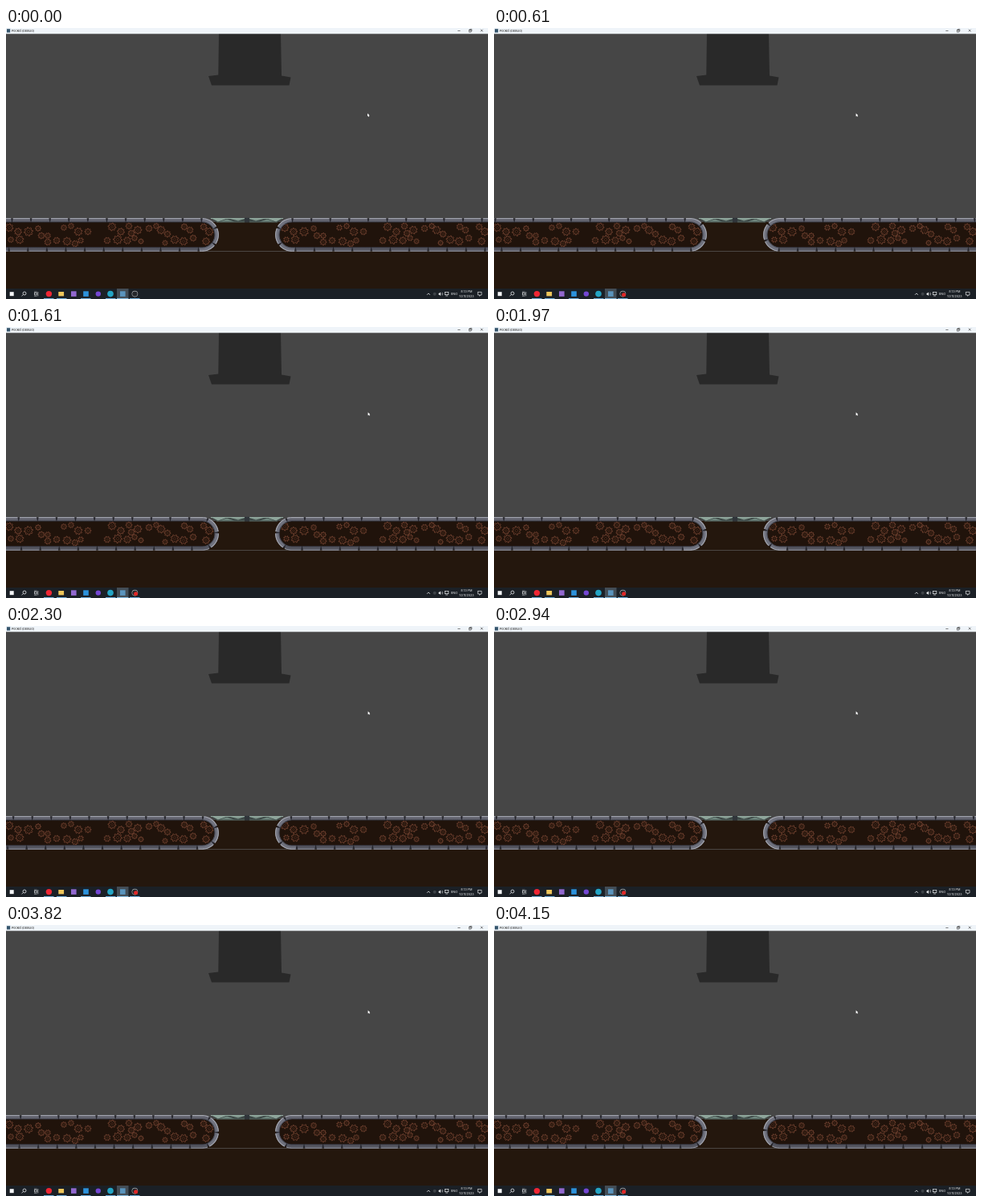
Animation, 600 px wide and 338 px high, one loop 4.18 s. Source, as an HTML page with a canvas:

```html
<!DOCTYPE html>
<html lang="en">
<head>
<meta charset="utf-8">
<title>Conveyor</title>
<style>
  html, body { margin: 0; width: 100%; height: 100%; overflow: hidden; background: #454545; }
  canvas { display: block; width: 600px; height: 338px; }
</style>
</head>
<body>
<canvas id="stage"></canvas>
<script>
const W = 600, H = 338, LOOP = 4180;
const canvas = document.getElementById('stage');
const dpr = window.devicePixelRatio || 1;
canvas.width = W * dpr;
canvas.height = H * dpr;
const ctx = canvas.getContext('2d');
const FONT = 'Inter, "Open Sans", sans-serif';

// Belt geometry: a long straight run closed by a half circle
const CAP_X = 244, MID_Y = 257.9, OUTER = 21, INNER = 15.4;
const ARC = Math.PI * OUTER, PITCH = 23.6, SPEED = 9.55 / 1000;

// x, y, radius
const GEARS = [
  [4, 249, 5], [15, 254, 4.5], [28, 254, 5.5], [40, 250, 3.5], [6, 264, 3.5],
  [17, 264, 5], [44, 259, 4], [52, 259, 3.5], [52, 267, 4], [63, 265, 4],
  [72, 249, 3.5], [81, 247, 3.5], [90, 254, 5], [102, 254, 4], [76, 266, 5],
  [86, 269, 4], [93, 265, 3.5], [132, 248, 5], [143, 254, 4.5], [153, 247, 4],
  [164, 252, 5], [156, 256, 4], [126, 265, 4], [139, 264, 5.5], [151, 265, 4.5],
  [160, 262, 3.5], [168, 266, 3.2], [178, 250, 4], [187, 247, 3.5], [193, 252, 5],
  [201, 257, 4], [198, 268, 3.2], [210, 264, 5], [222, 248, 4], [229, 252, 4],
  [221, 266, 5], [233, 262, 4], [246, 248, 4], [253, 254, 5], [249, 266, 4.5]
];

function rect(x, y, w, h, color) {
  ctx.fillStyle = color;
  ctx.fillRect(x, y, w, h);
}

function disc(x, y, r, color) {
  ctx.fillStyle = color;
  ctx.beginPath();
  ctx.arc(x, y, r, 0, Math.PI * 2);
  ctx.fill();
}

function poly(points, color) {
  ctx.fillStyle = color;
  ctx.beginPath();
  for (const [x, y] of points) ctx.lineTo(x, y);
  ctx.closePath();
  ctx.fill();
}

function line(points, color, width) {
  ctx.strokeStyle = color;
  ctx.lineWidth = width;
  ctx.beginPath();
  for (const [x, y] of points) ctx.lineTo(x, y);
  ctx.stroke();
}

function label(text, x, y, size, color, align = 'left') {
  ctx.font = size + 'px ' + FONT;
  ctx.fillStyle = color;
  ctx.textAlign = align;
  ctx.textBaseline = 'middle';
  ctx.fillText(text, x, y);
}

function beltPoint(s, r) {
  if (s < 0) return [CAP_X + s, MID_Y - r];
  if (s > ARC) return [CAP_X - (s - ARC), MID_Y + r];
  const a = s / OUTER;
  return [CAP_X + r * Math.sin(a), MID_Y - r * Math.cos(a)];
}

function beltCurve(from, to, r) {
  const n = 14, points = [];
  for (let i = 0; i <= n; i++) points.push(beltPoint(from + (to - from) * i / n, r));
  return points;
}

function insidePath(r) {
  ctx.beginPath();
  ctx.moveTo(-2, MID_Y - r);
  ctx.lineTo(CAP_X, MID_Y - r);
  ctx.arc(CAP_X, MID_Y, r, -Math.PI / 2, Math.PI / 2);
  ctx.lineTo(-2, MID_Y + r);
  ctx.closePath();
}

function gear(x, y, r) {
  const teeth = 8, n = teeth * 4;
  ctx.beginPath();
  for (let i = 0; i < n; i++) {
    const a = i / n * Math.PI * 2 + x;
    const d = i % 4 < 2 ? r : r * 0.7;
    ctx.lineTo(x + d * Math.cos(a), y + d * Math.sin(a));
  }
  ctx.closePath();
  ctx.strokeStyle = '#714230';
  ctx.lineWidth = 0.95;
  ctx.stroke();
  ctx.beginPath();
  ctx.arc(x, y, r * 0.3, 0, Math.PI * 2);
  ctx.strokeStyle = '#55301f';
  ctx.lineWidth = 0.6;
  ctx.stroke();
}

function plate(s) {
  const a = s + 0.45, b = s + PITCH - 0.45, mid = s + PITCH / 2;
  const onCap = mid > 0 && mid < ARC;
  const low = mid >= ARC;
  const body = beltCurve(a + 0.9, b - 0.9, OUTER - 0.2)
    .concat(beltCurve(b, a, INNER + 0.4));
  poly(body, onCap ? '#70727e' : low ? '#555660' : '#62636e');
  line(beltCurve(a + 0.9, b - 0.9, OUTER - 0.7), low ? '#8d8e97' : '#a5a7b0', 1.1);
  line(beltCurve(a, b, INNER + 0.8), '#42434d', 0.8);
}

function belt(t) {
  insidePath(OUTER - 0.8);
  ctx.fillStyle = '#26262d';
  ctx.fill();
  insidePath(INNER);
  ctx.fillStyle = '#20130b';
  ctx.fill();
  const start = -0.5 - SPEED * t;
  const first = Math.floor((-CAP_X - PITCH - start) / PITCH);
  const end = ARC + CAP_X + PITCH;
  for (let s = start + first * PITCH; s < end; s += PITCH) plate(s);
}

function mirrored(draw) {
  ctx.save();
  ctx.translate(W, 0);
  ctx.scale(-1, 1);
  draw();
  ctx.restore();
}

function gears(shift, flip) {
  ctx.save();
  if (flip) mirrored(() => insidePath(INNER));
  else insidePath(INNER);
  ctx.clip();
  for (const [x, y, r] of GEARS) gear(x + shift, y, r);
  ctx.restore();
}

function hatchHalf() {
  poly([[255, 237], [300, 237], [300, 242.3], [262, 242.3]], '#3c4745');
  line([[255, 237.5], [300, 237.5]], '#93aaa0', 1);
  poly([[257, 238], [274, 238], [264, 241.4]], '#8da49a');
  poly([[266, 241.6], [275, 238.6], [284, 241.6]], '#6f877e');
  poly([[279, 238], [297, 238], [289, 240.6]], '#82998f');
  line([[262, 242], [297, 242]], '#60736c', 0.8);
}

function scene(t) {
  rect(0, 0, W, H, '#464646');
  poly([[265, 7], [342, 7], [343, 59.5], [354.5, 61.5], [352.5, 71.5],
        [256, 71.5], [252, 60], [264.3, 58.5]], '#292929');
  rect(0, 242, W, 84, '#24170d');
  rect(0, 278, W, 1, '#4b4643');
  hatchHalf();
  mirrored(hatchHalf);
  rect(297, 236.8, 6, 5.7, '#30353a');
  belt(t);
  mirrored(() => belt(t));
  gears(0, false);
  gears(343, true);
}

function titleBar() {
  rect(0, 0, W, 7.3, '#eff4f9');
  rect(1, 1.2, 4.2, 4.4, '#36566d');
  label('Pocket (DEBUG)', 7, 3.7, 3.7, '#1d1d1d');
  line([[562.3, 3.5], [565.5, 3.5]], '#333', 0.6);
  ctx.lineWidth = 0.6;
  ctx.strokeRect(576.3, 2.5, 2.5, 2.5);
  line([[577.3, 2.3], [577.3, 1.5], [579.8, 1.5], [579.8, 4], [579, 4]], '#333', 0.6);
  line([[590.8, 1.8], [593.6, 4.6]], '#333', 0.6);
  line([[593.6, 1.8], [590.8, 4.6]], '#333', 0.6);
}

function tray() {
  const ink = '#e4e6e8';
  line([[524, 332.8], [525.9, 330.9], [527.8, 332.8]], ink, 0.8);
  disc(533.6, 331.7, 2, '#3d4247');
  poly([[538.5, 330.8], [539.6, 330.8], [541, 329.4], [541, 334], [539.6, 332.7], [538.5, 332.7]], ink);
  for (const r of [1.4, 2.7]) {
    ctx.beginPath();
    ctx.arc(541, 331.7, r, -0.8, 0.8);
    ctx.lineWidth = 0.5;
    ctx.stroke();
  }
  ctx.lineWidth = 0.7;
  ctx.strokeRect(546.4, 329.6, 4.4, 3.1);
  line([[547.2, 334], [550, 334]], ink, 0.7);
  label('ENG', 554, 331.9, 3.9, ink);
  label('8:13 PM', 573.3, 328.7, 3.8, ink, 'center');
  label('10/11/2023', 573.3, 334.6, 3.7, ink, 'center');
  line([[587.4, 329.4], [592, 329.4], [592, 333], [590.6, 333], [589.6, 334.4],
        [589.6, 333], [587.4, 333], [587.4, 329]], ink, 0.7);
}

function taskbar(recording) {
  const ink = '#e6e8ea';
  rect(0, 325, W, 13, '#1b2026');
  rect(138, 325, 14.5, 13, '#434d56');
  rect(4.7, 329.2, 5, 5, '#f4f6f8');
  ctx.strokeStyle = ink;
  ctx.lineWidth = 0.8;
  ctx.beginPath();
  ctx.arc(23, 331, 2, 0, Math.PI * 2);
  ctx.stroke();
  line([[21.5, 332.4], [19.5, 334.4]], ink, 0.8);
  ctx.lineWidth = 0.6;
  ctx.strokeRect(35.3, 330.5, 3, 2.3);
  line([[35, 329.1], [38.6, 329.1]], ink, 0.6);
  line([[35, 334.2], [38.6, 334.2]], ink, 0.6);
  line([[39.8, 329], [39.8, 334.4]], ink, 0.6);

  disc(53.4, 331.6, 3.7, '#ef2634');
  rect(65.3, 329, 6.8, 5.4, '#efc65b');
  rect(81, 328.3, 6.6, 6.6, '#9268cf');
  rect(96.2, 328.3, 6.6, 6.6, '#2c92dc');
  disc(114.8, 331.6, 3.2, '#7447d3');
  disc(130, 331.6, 3.8, '#24a5c5');
  rect(142, 328.3, 6.6, 6.6, '#5a94bd');
  disc(160.4, 331.6, 3.8, '#aeb1b4');
  disc(160.4, 331.6, 3.2, '#25272b');
  if (recording) disc(161.6, 332.7, 2.5, '#e22828');
  for (const x of [47, 63, 93, 124, 154]) rect(x, 337.1, 12.5, 0.9, '#76b9e8');
  rect(138, 337.1, 14.5, 0.9, '#8ccaf2');
  tray();
}

function pointer(x, y) {
  const tip = [[0, 0], [0, 4.2], [1, 3.4], [1.6, 4.8], [2.3, 4.5], [1.7, 3.1], [3, 3]];
  const points = tip.map(([dx, dy]) => [x + dx, y + dy]);
  line(points.concat([points[0]]), '#222', 0.6);
  poly(points, '#fff');
}

function draw(t) {
  ctx.setTransform(dpr, 0, 0, dpr, 0, 0);
  scene(t);
  titleBar();
  taskbar(t >= 150);
  pointer(t < 150 ? 449.9 : 450.5, 106.3);
}

const begin = performance.now();
function tick() {
  draw((performance.now() - begin) % LOOP);
  requestAnimationFrame(tick);
}
tick();
</script>
</body>
</html>
```
